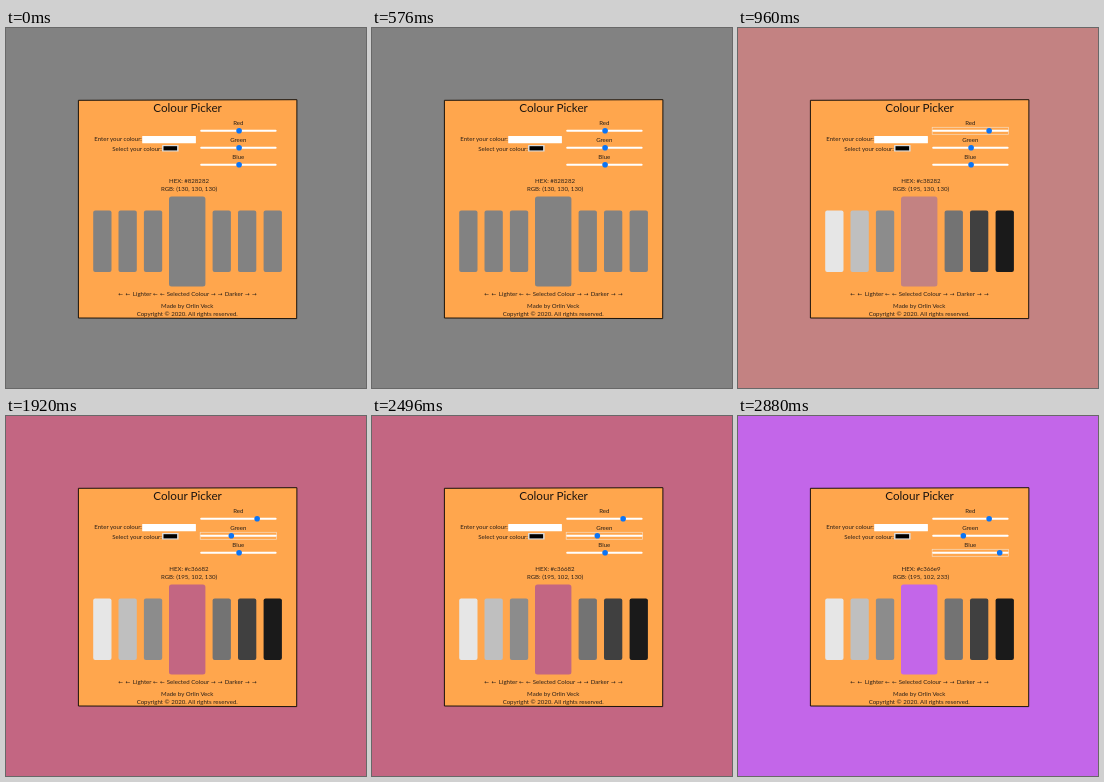
Animation of 360x360 px, one loop 3840 ms. Source, as an HTML page:

```html
<!DOCTYPE html>
<html lang="en">
<head>
<meta charset="utf-8">
<title>Colour Picker</title>
<style>
  html, body { margin: 0; width: 100%; height: 100%; overflow: hidden; }
  svg { display: block; width: 100vw; height: 100vh; }
  text { font: 6.1px Lato, "Open Sans", sans-serif; fill: #2b2018; text-anchor: middle; }
  .title { font-size: 11.7px; fill: #1c1510; }
  .left { text-anchor: start; }
  .arrow { font: 5.6px "DejaVu Sans", sans-serif; }
</style>
</head>
<body>
<svg id="stage" viewBox="0 0 360 360"></svg>
<script>
const STEP = 960;
const states = [
  { rgb: [130, 130, 130], focus: -1, shaded: false },
  { rgb: [195, 130, 130], focus: 0, shaded: true },
  { rgb: [195, 102, 130], focus: 1, shaded: true },
  { rgb: [195, 102, 233], focus: 2, shaded: true }
];
const shades = ['#e6e6e6', '#bfbfbf', '#8c8c8c', '#737373', '#404040', '#1a1a1a'];
const barX = [87.2, 112.5, 137.9, 206.6, 232, 257.6];
const stage = document.getElementById('stage');

function add(tag, attrs, content) {
  const el = document.createElementNS('http://www.w3.org/2000/svg', tag);
  for (const key in attrs) el.setAttribute(key, attrs[key]);
  if (content) el.textContent = content;
  return stage.appendChild(el);
}
const rect = (x, y, width, height, fill, rx = 0) =>
  add('rect', { x, y, width, height, fill, rx });
const label = (x, y, content, cls = '') => add('text', { x, y, class: cls }, content);

const page = rect(0, 0, 360, 360, '#828282');
add('path', { d: 'M72.4 72.3L290.9 71.7L290.7 290.6L72.4 290Z', fill: '#ffa64d', stroke: '#1a120a' });
label(181.5, 84, 'Colour Picker', 'title');

label(88.3, 113.3, 'Enter your colour:', 'left');
rect(136.2, 108, 53.7, 7.2, '#fff', 0.5);
label(106.3, 123, 'Select your colour:', 'left');
rect(156, 117, 16.6, 6.6, '#dcdcdc', 0.5);
rect(157.5, 118.2, 13.6, 4.2, '#000');

const sliders = ['Red', 'Green', 'Blue'].map((name, i) => {
  const y = 102.8 + i * 17;
  label(232.3, y - 6.2, name);
  const ring = add('rect', {
    x: 194.2, y: y - 3.5, width: 76.4, height: 7,
    fill: 'none', stroke: '#f6dcc0', 'stroke-width': 0.7
  });
  rect(194.2, y - 1, 76.4, 2, '#fff', 1);
  const thumb = add('circle', { cy: y, r: 2.8, fill: '#0b74f5' });
  return { ring, thumb };
});

const hexText = label(183, 154.8, '');
const rgbText = label(183, 162.7, '');
const bars = barX.map(x => rect(x, 182.5, 18.3, 61.5, '#828282', 2));
const mainBar = rect(163, 168.4, 36.4, 90, '#828282', 2.5);

label(136.2, 268.2, 'Lighter');
label(182, 268.2, 'Selected Colour');
label(227.8, 268.2, 'Darker');
[114.7, 121.8, 149.4, 156.4].forEach(x => label(x, 268.2, '←', 'arrow'));
[207.3, 214, 241.3, 248.3].forEach(x => label(x, 268.2, '→', 'arrow'));
label(181.2, 279.8, 'Made by Orlin Veck');
label(181.2, 287.7, 'Copyright © 2020. All rights reserved.');

function render(time) {
  const { rgb, focus, shaded } = states[Math.floor(time / STEP) % states.length];
  const hex = '#' + rgb.map(v => v.toString(16).padStart(2, '0')).join('');
  page.setAttribute('fill', hex);
  mainBar.setAttribute('fill', hex);
  bars.forEach((bar, i) => bar.setAttribute('fill', shaded ? shades[i] : hex));
  sliders.forEach(({ ring, thumb }, i) => {
    thumb.setAttribute('cx', 197 + rgb[i] / 255 * 70.8);
    ring.setAttribute('visibility', i === focus ? 'visible' : 'hidden');
  });
  hexText.textContent = 'HEX: ' + hex;
  rgbText.textContent = `RGB: (${rgb.join(', ')})`;
}

const start = performance.now();
function tick() {
  render(performance.now() - start);
  requestAnimationFrame(tick);
}
render(0);
requestAnimationFrame(tick);
</script>
</body>
</html>
```
